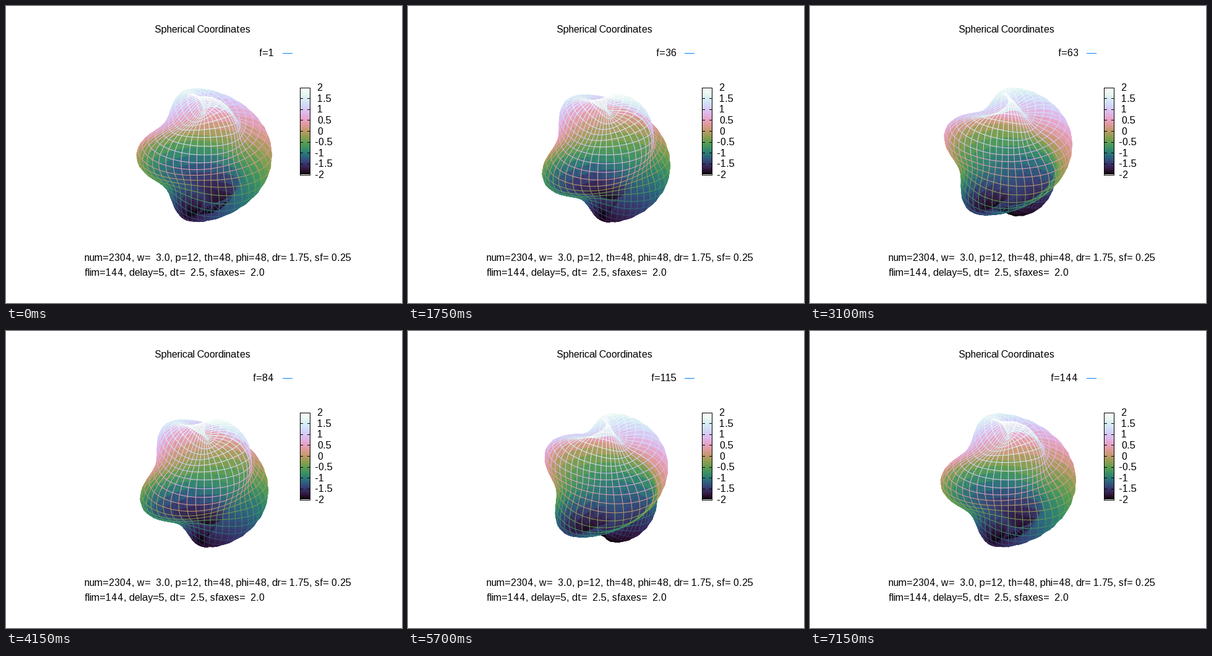
A matplotlib script for the animation above (7200 ms loop, 640 by 480 pixels).

```python
import numpy as np
import matplotlib.pyplot as plt
from matplotlib.animation import FuncAnimation
from matplotlib.collections import LineCollection, QuadMesh
from matplotlib.colors import ListedColormap, Normalize
from matplotlib.patches import Rectangle

W, H, DPI = 640, 480, 100
FRAMES, STEP_MS = 144, 50
CYCLE = 48                      # frames per wave period
ROWS, COLS = 24, 48             # cells along theta and phi
RADIUS, AMP, LIM = 1.75, 0.25, 2.0
CX, CY, UNIT = 320.4, 240.8, 54.7
TILT, TURN = np.radians(60), np.radians(30)
PX = 72 / DPI                   # one pixel in points

plt.rcParams.update({"font.family": "Liberation Sans",
                     "text.hinting": "force_autohint",
                     "text.hinting_factor": 1})
fig = plt.figure(figsize=(W / DPI, H / DPI), dpi=DPI, facecolor="white")
ax = fig.add_axes([0, 0, 1, 1])
ax.axis("off")


def cubehelix(gamma=1.5, start=0.5, cycles=-1.5, n=256):
    """Cubehelix ramp whose lightness, but not hue, is gamma corrected."""
    gray = np.linspace(0, 1, n)
    phi = 2 * np.pi * (start / 3 + cycles * gray)
    light = gray ** (1 / gamma)
    amp = light * (1 - light) / 2
    c, s = np.cos(phi), np.sin(phi)
    rgb = [light + amp * (-0.14861 * c + 1.78277 * s),
           light + amp * (-0.29227 * c - 0.90649 * s),
           light + amp * 1.97294 * c]
    return ListedColormap(np.clip(np.transpose(rgb), 0, 1))


cmap, norm = cubehelix(), Normalize(-LIM, LIM)
theta, lon = np.meshgrid(np.linspace(0, np.pi, ROWS + 1),
                         np.linspace(0, 2 * np.pi, COLS + 1) - TURN,
                         indexing="ij")


def label(x, y, s, **kw):
    return ax.text(x, y, s, fontsize=16 * PX, color="black",
                   va="baseline", **kw)


def surface(k):
    """Screen points, heights and nearness of the rippled sphere at step k."""
    phase = 4 * theta + 2 * lon + 2 * np.pi * (k - 0.5) / CYCLE
    r = RADIUS + AMP * np.cos(phase)
    x = r * np.sin(theta) * np.cos(lon)
    y = r * np.sin(theta) * np.sin(lon)
    z = r * np.cos(theta)
    up = z * np.sin(TILT) + y * np.cos(TILT)
    near = z * np.cos(TILT) - y * np.sin(TILT)
    return np.stack([CX + UNIT * x, CY - UNIT * up], axis=-1), z, near


def segments(pts, z, near):
    """Pieces of the lines along the second grid axis."""
    pairs = np.stack([pts[:, :-1], pts[:, 1:]], axis=2).reshape(-1, 2, 2)
    return pairs, z[:, 1:].ravel(), (near[:, :-1] + near[:, 1:]).ravel()


def make_pose(k):
    grid = surface(k)
    pts, z, _ = grid
    mean = (z[:-1, :-1] + z[1:, :-1] + z[:-1, 1:] + z[1:, 1:]) / 4
    # Cells go from north to south, so the far side ends up on top.
    fill = QuadMesh(pts, antialiased=False, cmap=cmap, norm=norm)
    fill.set_array(mean)
    rings = segments(*grid)
    ribs = segments(*(g.swapaxes(0, 1) for g in grid))
    lines, heights, near = (np.concatenate(p) for p in zip(rings, ribs))
    order = np.argsort(near)
    wires = LineCollection(lines[order], cmap=cmap, norm=norm, linewidths=PX)
    wires.set_array(heights[order])
    for art in (fill, wires):
        art.set_visible(False)
        ax.add_collection(art, autolim=False)
    return fill, wires


def draw_colorbar(x0=474.5, x1=490.5, y0=131.5, y1=272.5):
    ramp = np.linspace(1, 0, 141)[:, None]
    ax.imshow(ramp, cmap=cmap, extent=(x0, x1, y1, y0), aspect="auto",
              interpolation="nearest", vmin=0, vmax=1)
    ax.add_patch(Rectangle((x0, y0), x1 - x0, y1 - y0, fill=False,
                           ec="black", lw=PX))
    for v in np.arange(-2, 2.1, 0.5):
        y = y0 + (LIM - v) / (2 * LIM) * (y1 - y0)
        for a, b in ((x0, x0 + 4), (x1 - 4, x1)):
            ax.plot([a, b], [y, y], color="black", lw=PX)
        label(499 if v < 0 else 503, y + 5.5, f"{v:g}".replace("\u2212", "-"))


label(318, 43, "Spherical Coordinates", ha="center")
label(127, 412, "num=2304, w=  3.0, p=12, th=48, phi=48, dr= 1.75, sf= 0.25")
label(127, 436, "flim=144, delay=5, dt=  2.5, sfaxes=  2.0")
counter = label(433.5, 81, "", ha="right")
ax.plot([447, 462], [75.5, 75.5], color="#0080ff", lw=PX)
draw_colorbar()
ax.set_xlim(0, W)
ax.set_ylim(H, 0)
poses = [make_pose(k) for k in range(CYCLE)]


def update(i):
    for k, pose in enumerate(poses):
        for art in pose:
            art.set_visible(k == i % CYCLE)
    counter.set_text(f"f={i + 1}")
    return [counter]


anim = FuncAnimation(fig, update, frames=FRAMES, interval=STEP_MS,
                     repeat=True, repeat_delay=0, blit=False)
plt.show()
```
